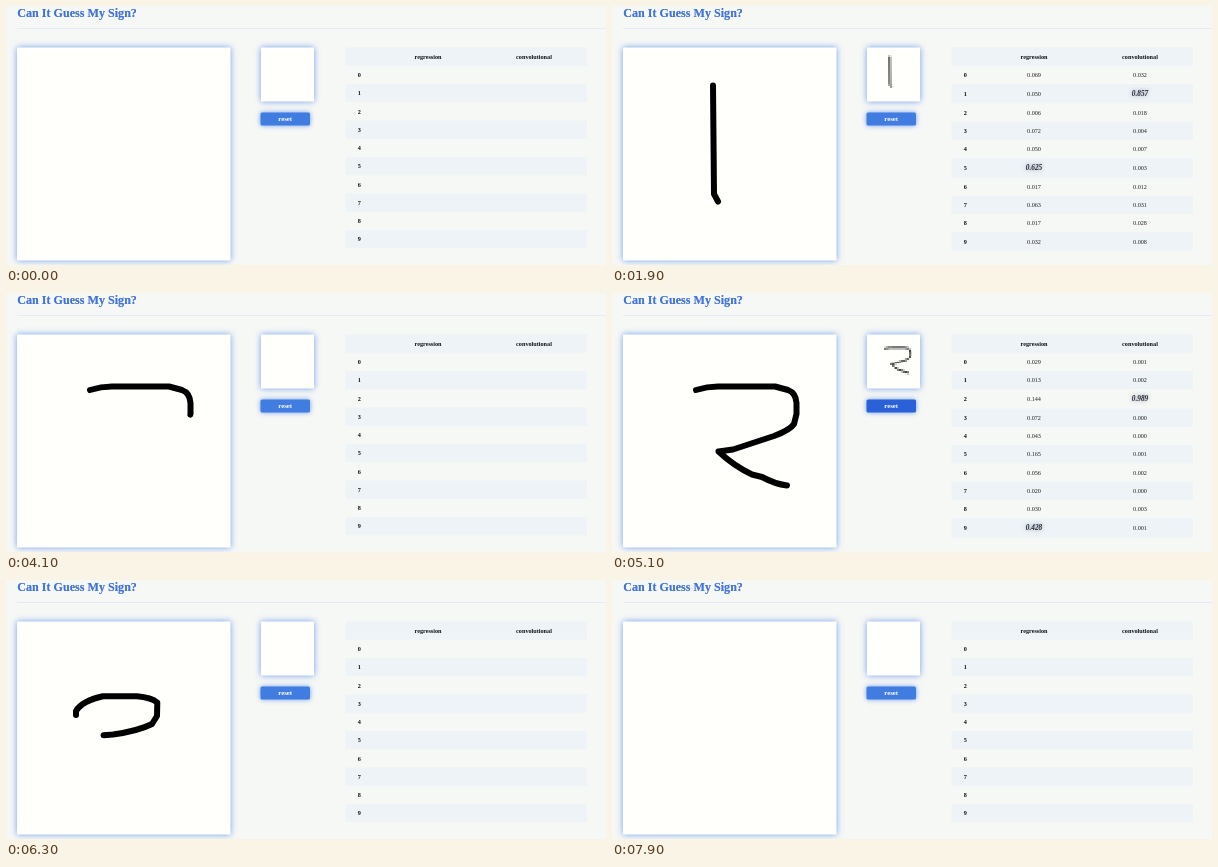
Recreate the animation shown at these times as an HTML page with a canvas. Size 600 by 259 pixels, loop 8 s.

```html
<!DOCTYPE html>
<html lang="en">
<head>
<meta charset="utf-8">
<title>Digit sketchpad</title>
<style>
  html, body { margin: 0; width: 100%; height: 100%; overflow: hidden; background: #f6f8f5; }
  canvas, svg { position: absolute; left: 0; top: 0; width: 600px; height: 259px; }
  text { font: 6.2px "Liberation Serif", "Times New Roman", serif; fill: #222; text-anchor: middle; }
  .bold { font-weight: bold; fill: #111; }
  .title { font-size: 12.1px; font-weight: bold; fill: #4173dd; text-anchor: start;
           filter: drop-shadow(.6px .6px .7px rgba(65, 105, 225, .6)); }
  .button { font-size: 6.8px; font-weight: bold; fill: #fff; }
  .best { font-size: 7.3px; font-weight: bold; font-style: italic; fill: #26282e;
          filter: drop-shadow(0 0 2px rgba(110, 125, 160, .85)); }
</style>
</head>
<body>
<canvas id="stage" width="600" height="259"></canvas>
<svg id="labels" viewBox="0 0 600 259"></svg>
<script>
const LOOP = 8000, STEP = 100;
const PAD = { x: 11, y: 41.5, w: 213.5, h: 213 };
const VIEW = { x: 255, y: 41.5, w: 53, h: 54 };
const BUTTON = { x: 254.5, y: 106.5, w: 49.5, h: 13 };
const GLOW = "rgba(85, 140, 240, .85)";
const GRID = 28, ROW = 18.25, TALL = 1.1;
const COLUMNS = { regression: 422, convolutional: 528 };
const SVG = "http://www.w3.org/2000/svg";

// each guess: [digit, score]
const rounds = [
  { start: 1100, end: 1750, result: 1900, hover: 2900, clear: 3300, leave: 3400,
    d: "M101 79.5L102 188L106 195.5",
    regression: [5, .625], convolutional: [1, .857] },
  { start: 3700, end: 4660, result: 4900, hover: 5000, clear: 5300, leave: 5500,
    d: "M84 97Q95 93.5 106 93.5H163L176 97Q184 100 184.5 110V121L182 131Q178 137 162 143" +
       "L121 156.5L106.5 158.5Q122 173 140 181.5L150 184Q163 191 175 192.5",
    regression: [9, .428], convolutional: [2, .989] },
  { start: 5900, end: 6670, result: 6800, hover: 7300, clear: 7400, leave: 7600,
    d: "M70 135V131Q76 121 97 116.3H131Q145 117.5 151.3 122.5L151 136L146 144" +
       "Q132 151 107 154.5L94 155.5Q150 160 150 184Q145 215 82 207",
    regression: [3, .706], convolutional: [3, .991] }
];

const ctx = document.getElementById("stage").getContext("2d");
const labels = document.getElementById("labels");

function label(text, x, y, cls = "") {
  const el = document.createElementNS(SVG, "text");
  el.setAttribute("x", x);
  el.setAttribute("y", y);
  el.setAttribute("class", cls);
  el.textContent = text;
  labels.append(el);
  return el;
}

label("Can It Guess My Sign?", 11.3, 11, "title");
label("reset", 279.2, 115.1, "button");
for (const name in COLUMNS) label(name, COLUMNS[name], 52.7, "bold");
const rows = Array.from({ length: 10 }, (_, i) => ({
  digit: label(i, 353.2, 0, "bold"),
  regression: label("", COLUMNS.regression, 0),
  convolutional: label("", COLUMNS.convolutional, 0)
}));

function seeded(seed) {
  return () => {
    const v = Math.sin(seed++ * 12.9898) * 43758.5453;
    return v - Math.floor(v);
  };
}

// the other digits share what the best score leaves
function scores([best, score], seed) {
  const rand = seeded(seed);
  const weights = rows.map((_, i) => i === best ? 0 : .05 + rand() ** 2);
  const sum = weights.reduce((a, b) => a + b);
  return weights.map((w, i) => i === best ? score : (1 - score) * w / sum);
}

function trace(c, round, part) {
  c.save();
  c.lineWidth = 6;
  c.lineCap = c.lineJoin = "round";
  c.strokeStyle = "#000";
  c.setLineDash([Math.max(.1, part * round.length), 9999]);
  c.stroke(round.path);
  c.restore();
}

function thumbnail(round) {
  const cv = document.createElement("canvas");
  cv.width = cv.height = GRID;
  const c = cv.getContext("2d");
  c.scale(GRID / PAD.w, GRID / PAD.h);
  c.translate(-PAD.x, -PAD.y);
  trace(c, round, 1);
  return cv;
}

rounds.forEach((r, i) => {
  const el = document.createElementNS(SVG, "path");
  el.setAttribute("d", r.d);
  r.length = el.getTotalLength();
  r.path = new Path2D(r.d);
  r.thumb = thumbnail(r);
  r.values = {
    regression: scores(r.regression, 10 + i * 40),
    convolutional: scores(r.convolutional, 30 + i * 40)
  };
});

function panel({ x, y, w, h }, fill, blur, radius) {
  ctx.save();
  ctx.shadowColor = GLOW;
  ctx.shadowBlur = blur;
  ctx.fillStyle = fill;
  ctx.beginPath();
  ctx.roundRect(x, y, w, h, radius);
  ctx.fill();
  ctx.restore();
}

// rows holding a highlighted score grow a little
function drawTable(round) {
  ctx.fillStyle = "#eef3f7";
  ctx.fillRect(339.5, 41.5, 241.5, ROW);
  let y = 41.5 + ROW;
  rows.forEach((row, i) => {
    const tall = Object.keys(COLUMNS).some(name => round && round[name][0] === i);
    const h = ROW + (tall ? TALL : 0);
    if (i % 2) ctx.fillRect(339.5, y, 241.5, h);
    for (const el of Object.values(row)) el.setAttribute("y", y + h / 2 + 2.2);
    for (const name in COLUMNS) {
      row[name].textContent = round ? round.values[name][i].toFixed(3) : "";
      row[name].setAttribute("class", round && round[name][0] === i ? "best" : "");
    }
    y += h;
  });
}

function draw(t) {
  ctx.fillStyle = "#f6f8f5";
  ctx.fillRect(0, 0, 600, 259);
  ctx.fillStyle = "#e6e9f8";
  ctx.fillRect(11, 22, 589, 1);

  const round = rounds.find(r => t >= r.start && t < r.clear);
  const done = round && t >= round.result ? round : null;
  const hover = rounds.some(r => t >= r.hover && t < r.leave) || (t >= 500 && t < 700);
  drawTable(done);
  panel(PAD, "#fffffc", 6, 1);
  panel(VIEW, "#fffffc", 6, 1);
  panel(BUTTON, hover ? "#2a60d8" : "#417de1", 5, 1.5);

  if (round) trace(ctx, round, Math.min(1, (t - round.start) / (round.end - round.start)));
  if (done) {
    ctx.imageSmoothingEnabled = false;
    ctx.drawImage(done.thumb, VIEW.x, VIEW.y, VIEW.w, VIEW.h);
  }
}

function tick() {
  const t = performance.now() % LOOP;
  draw(Math.floor(t / STEP) * STEP);
  requestAnimationFrame(tick);
}
tick();
</script>
</body>
</html>
```
